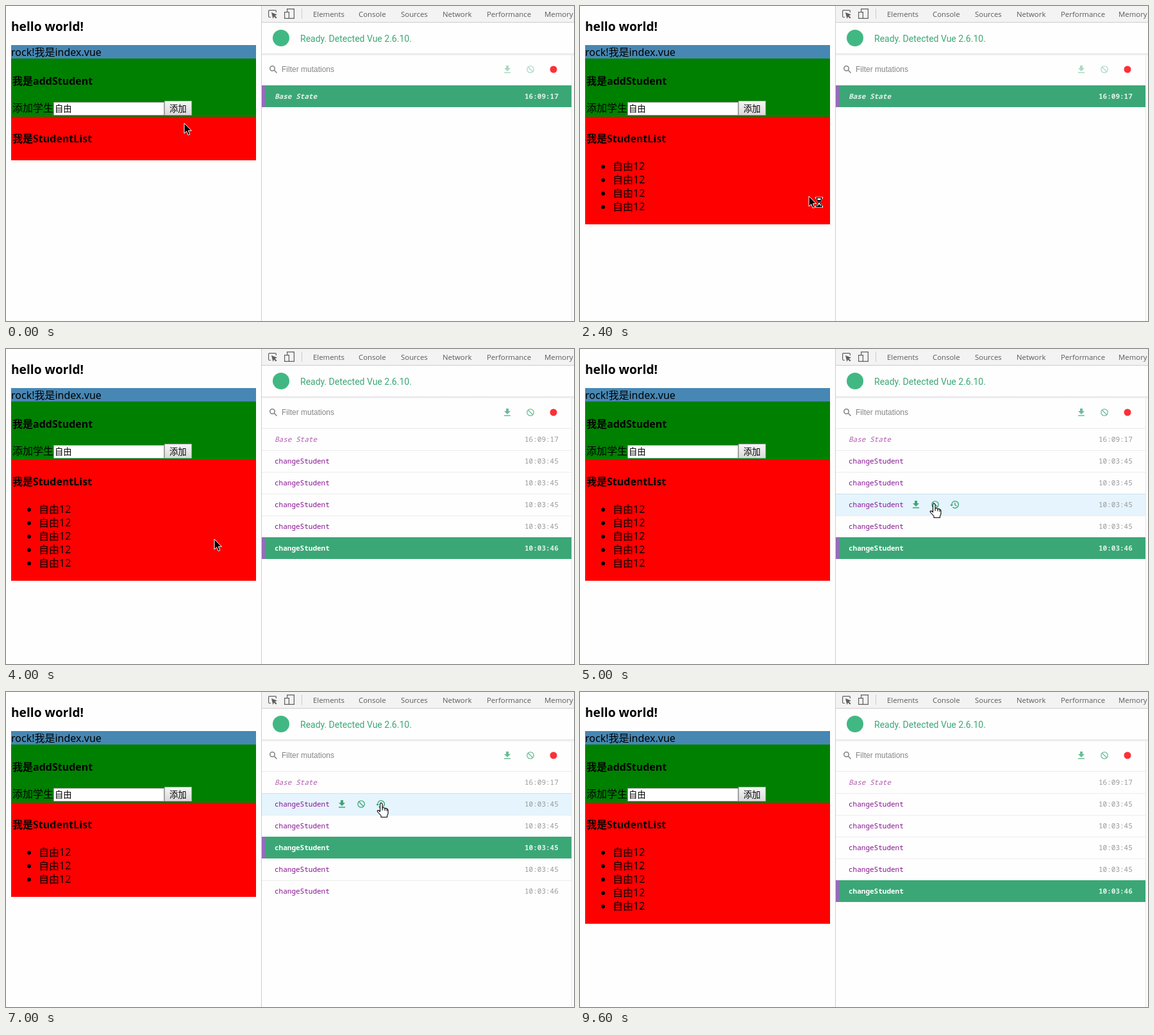
Write an HTML page that moves like this. It is 886 by 492 pixels and loops after 10000 ms.

```html
<!DOCTYPE html>
<html lang="zh-CN">
<head>
<meta charset="utf-8">
<title>Mutations</title>
<style>
html, body { margin: 0; width: 100%; height: 100%; overflow: hidden; background: #fefefe; }
svg { display: block; }
text { white-space: pre; }
.page { font: 16px "Noto Sans", "Noto Sans CJK SC", "Noto Sans CJK JP", sans-serif; }
.title { font-size: 19.2px; }
.bold { font-weight: 700; }
.thin { font-weight: 300; }
.field { font-size: 13.33px; }
.tabs { font: 11.4px "Open Sans", sans-serif; fill: #5a5a5a; }
.status { font: 14px Roboto, sans-serif; fill: #3ba776; }
.filter { font: 12px "Liberation Sans", Arial, sans-serif; fill: #858585; }
.row { font: 11px "Noto Sans Mono", "DejaVu Sans Mono", monospace; fill: #881391; }
.row .time { fill: #999; }
.base { font-style: italic; fill: #b05cae; }
.active { font-weight: 700; }
.active text, .active .time { fill: #fff; }
.active .base, .active .time { fill-opacity: .85; }
</style>
</head>
<body>
<svg width="886" height="492" viewBox="0 0 886 492">
  <defs>
    <linearGradient id="face" x2="0" y2="1">
      <stop stop-color="#f6f6f6"/><stop offset="1" stop-color="#dadada"/>
    </linearGradient>
    <linearGradient id="shade" x2="0" y2="1">
      <stop stop-color="#e2e2e2"/><stop offset="1" stop-color="#fefefe"/>
    </linearGradient>
    <path id="save" d="M-2-6H2V-2H5L0 3-5-2H-2ZM-5 4.2H5V5.7H-5Z" fill="currentColor"/>
    <g id="block" fill="none" stroke="currentColor" stroke-width="1.3">
      <circle r="5.2"/><path d="M-3.7-3.7 3.7 3.7"/>
    </g>
    <g id="travel" fill="none" stroke="currentColor" stroke-width="1.4">
      <path d="M-4.3 0A5.4 5.4 0 1 1-2.6 4M.9-3V.6L3.5 2.2"/>
      <path d="M-6.9 0H-1.8L-4.3 2.7Z" fill="currentColor" stroke="none"/>
    </g>
    <path id="arrow" d="M0 0V16L3.6 12.6 6.2 18.6 8.8 17.5 6.3 11.7H11.3Z" stroke="#fff"/>
    <g id="busy">
      <use href="#arrow"/>
      <path d="M10 1H22V4H20.5Q20.5 7 18 9.5 20.5 12 20.5 15H22V18H10V15H11.5Q11.5 12 14 9.5 11.5 7 11.5 4H10Z" fill="#fff"/>
      <path d="M11 2.5H21M11 16.5H21M12.5 3Q12.5 7 15.2 9.5 12.5 12 12.5 16M19.5 3Q19.5 7 16.8 9.5 19.5 12 19.5 16" fill="none" stroke="#000" stroke-width="1.4"/>
      <path d="M13.5 6H18.5L16 9ZM13.5 16 16 12 18.5 16Z"/>
    </g>
    <path id="hand" d="M-1.5 2Q-1.5 .5 0 .5 2 .5 2 2.5V8Q5 7.3 6 8.8 8.4 8.2 9.2 9.6 11 9.6 11 11.6V16Q11 18 9.5 20V22.5H0V20L-5 14.5Q-6.6 12.5-5 11.9-3.5 11.7-1.5 13.9ZM2 8V12M6 8.8V12.5M9.2 9.6V13" fill="#fff" stroke="#000" stroke-width="1.1" stroke-linejoin="round"/>
  </defs>

  <g class="page">
    <text class="title bold" x="8" y="38.5">hello world!</text>
    <path d="M8 61H390V82H8Z" fill="#4787b3"/>
    <path d="M8 82H390V173H8Z" fill="#008000"/>
    <text x="8" y="78">rock!我是index.vue</text>
    <text class="bold" x="10" y="123">我是addStudent</text>
    <text class="thin" x="10" y="165">添加学生</text>
    <path d="M74.5 150.5H246.5V170.5H74.5Z" fill="#fff" stroke="#a0a0a0"/>
    <text class="field" x="76" y="165">自由</text>
    <path d="M247.5 148.5H289.5V170.5H247.5Z" fill="url(#face)" stroke="#a3a3a3"/>
    <text class="field" x="255" y="165">添加</text>
    <rect id="panel" x="8" y="173" width="382" fill="#f00"/>
    <text class="bold" x="10" y="213">我是StudentList</text>
    <g id="list" class="thin"></g>
  </g>

  <path d="M399 0H886V25H399Z" fill="#f3f3f3"/>
  <path d="M398.5 0V492M399 25.5H886M461.5 4V20" stroke="#ccc"/>
  <g fill="none" stroke="#5f5f5f" stroke-width="1.2">
    <path d="M413 17.5H411Q409.6 17.5 409.6 16V8Q409.6 6.6 411 6.6H420Q421.4 6.6 421.4 8V10"/>
    <path d="M414 10 423 13.5 419.5 15 422.5 18 421 19.5 418 16.5 416.5 20Z" fill="#5f5f5f" stroke="none"/>
    <path d="M438.6 9V4.6H449.4V19.4H442M434.6 9.6H441.4V19.4H434.6Z"/>
  </g>
  <g class="tabs">
    <text x="479" y="17">Elements</text>
    <text x="550" y="17">Console</text>
    <text x="616" y="17">Sources</text>
    <text x="681" y="17">Network</text>
    <text x="750" y="17">Performance</text>
    <text x="840" y="17">Memory</text>
  </g>
  <circle cx="429" cy="50" r="13" fill="#41b883"/>
  <text class="status" x="459" y="56">Ready. Detected Vue 2.6.10.</text>
  <path d="M399 74H886V78H399Z" fill="url(#shade)"/>
  <g fill="none" stroke="#858585" stroke-width="1.6">
    <circle cx="415.5" cy="97.5" r="3.7"/><path d="M418.3 100.3 422.5 104.5"/>
  </g>
  <text class="filter" x="430" y="103">Filter mutations</text>
  <g id="tools" color="#3ba776">
    <use href="#save" x="782" y="99"/><use href="#block" x="818" y="99"/>
  </g>
  <circle cx="854" cy="99" r="5.5" fill="#fd3036"/>
  <path d="M882.5 76V492M399 124H882" stroke="#e8e8e8"/>
  <g id="rows"></g>
  <use id="cursor"/>
</svg>
<script>
const LOOP = 10000, STEP = 200, LEAVE = 9400;
const TOP = 124, ROW = 34, LINE = 21;
const GREEN = '#3ba776';
const $ = id => document.getElementById(id);
const clamp = (v, lo, hi) => Math.min(hi, Math.max(lo, v));

// places where the pointer rests
const stops = [
  { x: 278, y: 183, from: 0, to: 200 },
  { x: 268, y: 155, from: 1000, to: 1800 },
  { x: 357, y: 297, from: 2400, to: 2400 },
  { x: 307, y: 302, from: 3000, to: 3800 },
  { x: 552, y: 241, from: 5000, to: 5000 },
  { x: 584, y: 241, from: 5200, to: 6200 },
  { x: 585, y: 173, from: 7000, to: 7200 },
  { x: 572, y: 317, from: 8200, to: 8200 },
  { x: 584, y: 309, from: 8400, to: 8800 },
  { x: 640, y: 372, from: LEAVE, to: LOOP }
];
// clicks on the time travel icon
const trips = [{ at: 5400, row: 3 }, { at: 7200, row: 1 }, { at: 8600, row: 5 }];

function pointer(t) {
  const i = stops.findIndex(s => t <= s.to);
  const b = stops[i], a = stops[i - 1] || b;
  const k = t >= b.from ? 1 : (t - a.to) / (b.from - a.to);
  const e = k * k * (3 - 2 * k);
  return [a.x + (b.x - a.x) * e, a.y + (b.y - a.y) * e].map(Math.round);
}

function stateAt(t) {
  const trip = trips.filter(s => t >= s.at).pop();
  const count = t < 2800 ? 0 : clamp(4 + Math.floor((t - 2800) / 400), 4, 5);
  const added = clamp(Math.floor((t - 1200) / 280), 0, 5);
  const [x, y] = pointer(t);
  const shown = t < LEAVE;
  const under = Math.floor((y - TOP) / ROW);
  return {
    x, y, shown, count,
    students: trip ? trip.row : added,
    active: trip ? trip.row : count,
    indent: count < 5 ? 416 : 419,
    hover: shown && x > 399 && under >= 0 && under <= count ? under : -1,
    busy: t >= 2200 && t < 2800
  };
}

const box = (x, y, w, h, fill) => `<rect x="${x}" y="${y}" width="${w}" height="${h}" fill="${fill}"/>`;
const repeat = (n, draw) => Array.from({ length: n }, (_, i) => draw(i)).join('');

const student = i =>
  `<circle cx="36" cy="${251 + LINE * i}" r="3"/><text x="51" y="${256 + LINE * i}">自由12</text>`;

const icons = (y, color) => `<g color="${color}">` + ['save', 'block', 'travel']
  .map((name, i) => `<use href="#${name}" x="${524 + 30 * i}" y="${y}"/>`).join('') + '</g>';

function mutation(i, { count, active, hover, indent }) {
  const y = TOP + ROW * i, on = i === active, over = i === hover;
  const time = i === 0 ? '16:09:17' : `10:03:4${i < 5 ? 5 : 6}`;
  let s = '';
  if (on) s += box(399, y, 483, ROW, GREEN) + box(399, y, 5, ROW, '#966bbd');
  else {
    if (over) s += box(399, y, 483, ROW, '#e5f4fd') + box(399, y, 483, 1, '#cfe0ea');
    if (i < count) s += box(399, y + ROW, 483, 1, '#ececec');
  }
  s += `<text class="${i ? '' : 'base'}" x="${on || !i ? 419 : indent}" y="${y + 21}">${i ? 'changeStudent' : 'Base State'}</text>`;
  s += `<text class="time" x="809" y="${y + 21}">${time}</text>`;
  if (over) s += icons(y + ROW / 2, on ? '#fff' : GREEN);
  return `<g class="row${on ? ' active' : ''}">${s}</g>`;
}

function draw(t) {
  const state = stateAt(t), n = state.students;
  $('panel').setAttribute('height', n ? 84 + LINE * n : 68);
  $('list').innerHTML = repeat(n, student);
  $('tools').setAttribute('opacity', state.count ? .75 : .42);
  $('rows').innerHTML = repeat(state.count + 1, i => mutation(i, state));

  const kind = state.hover >= 0 ? 'hand' : state.busy ? 'busy' : 'arrow';
  const cursor = $('cursor');
  cursor.setAttribute('href', '#' + kind);
  cursor.setAttribute('transform', `translate(${state.x} ${state.y})`);
  cursor.setAttribute('visibility', state.shown ? 'visible' : 'hidden');
}

let last = -1;
const start = performance.now();
function tick() {
  const t = Math.floor((performance.now() - start) % LOOP / STEP) * STEP;
  if (t !== last) draw(last = t);
  requestAnimationFrame(tick);
}
tick();
</script>
</body>
</html>
```
